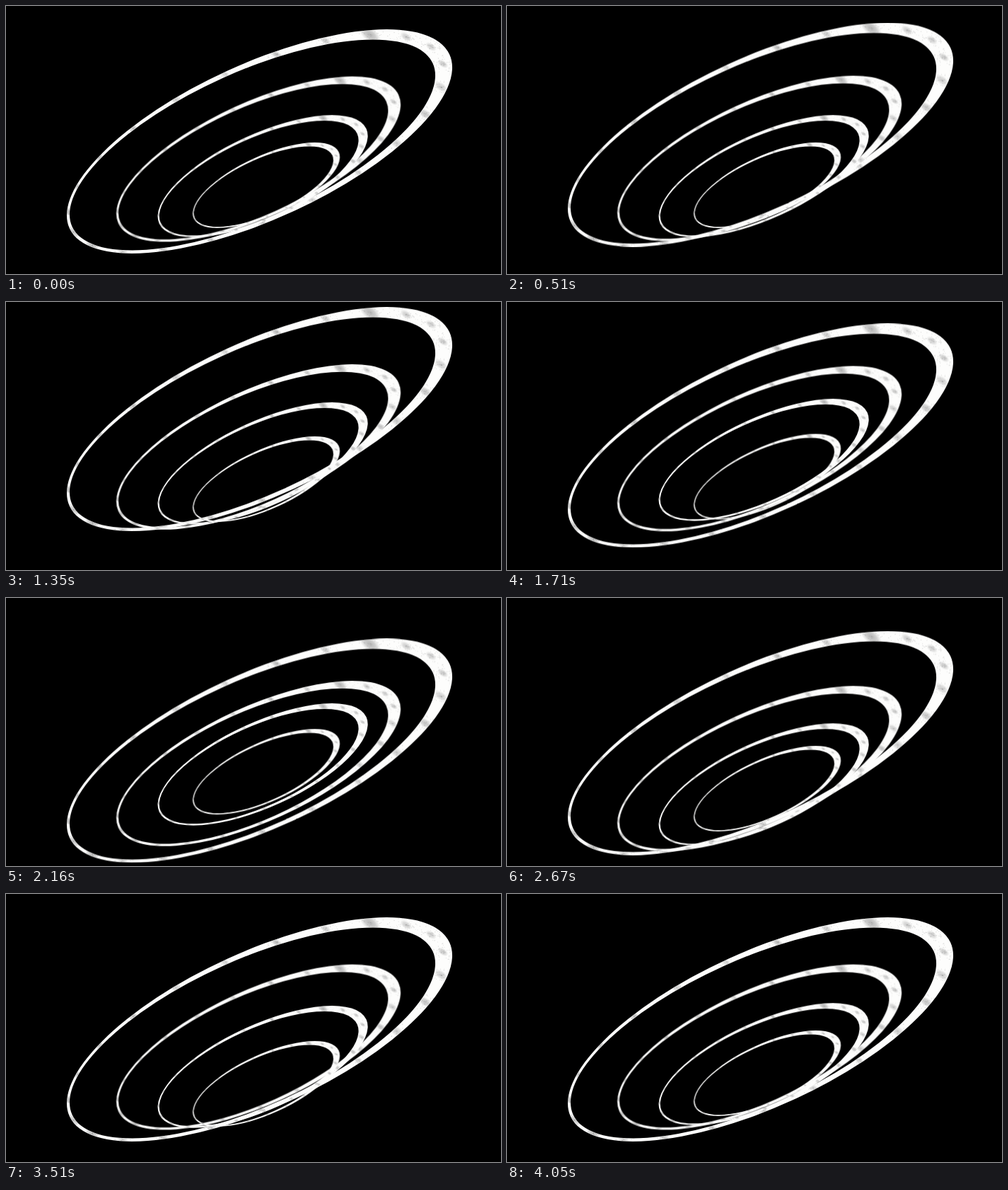
These frames come from a looping animation (700 by 379 pixels, 4.08 s). An HTML page:

```html
<!DOCTYPE html>
<html lang="en">
<head>
<meta charset="utf-8">
<title>Floating rings</title>
<style>
html, body { margin: 0; width: 100%; height: 100%; overflow: hidden; background: #000; }
svg { display: block; width: 100%; height: 100%; }

.ring {
  animation: bob 4080ms cubic-bezier(.37, 0, .63, 1) var(--delay) infinite both;
}
@keyframes bob {
  0% { transform: translateY(0); }
  31% { transform: translateY(var(--rise)); }
  53.7% { transform: translateY(var(--sink)); }
  79.2%, 100% { transform: translateY(0); }
}
</style>
</head>
<body>
<svg viewBox="0 0 700 379">
  <defs>
    <clipPath id="bandClip"><path id="band" fill-rule="evenodd" clip-rule="evenodd"/></clipPath>
    <radialGradient id="smudge">
      <stop offset="0" stop-color="#888" stop-opacity=".6"/>
      <stop offset=".5" stop-color="#888" stop-opacity=".4"/>
      <stop offset="1" stop-color="#999" stop-opacity="0"/>
    </radialGradient>
    <g id="marble">
      <use href="#band" fill="#fdfdfc"/>
      <g id="stains" clip-path="url(#bandClip)"></g>
    </g>
  </defs>
  <g id="rings"></g>
</svg>
<script>
const SVG = 'http://www.w3.org/2000/svg';
const RAD = Math.PI / 180;
const byId = id => document.getElementById(id);

function add(parent, tag, attrs) {
  const el = document.createElementNS(SVG, tag);
  for (const key in attrs) el.setAttribute(key, attrs[key]);
  parent.appendChild(el);
  return el;
}

let seed = 11;
const random = () => (seed = seed * 16807 % 2147483647) / 2147483647;

// Ellipses are tilted counterclockwise; angles run the same way.
const outer = { x: 358.5, y: 191.5, a: 295.5, b: 109.8, tilt: 24.6 };
const inner = { x: 348.5, y: 196.5, a: 279.9, b: 103.5, tilt: 24.35 };

function pointOn({ x, y, a, b, tilt }, degrees) {
  const u = a * Math.cos(degrees * RAD), v = b * Math.sin(degrees * RAD);
  const c = Math.cos(tilt * RAD), s = Math.sin(tilt * RAD);
  return [x + u * c - v * s, y - u * s - v * c];
}

function outline(e) {
  const start = pointOn(e, 180), end = pointOn(e, 0);
  // Slightly short radii are scaled up to span both ends exactly.
  const arc = `A${e.a * .999} ${e.b * .999} ${-e.tilt} 1 1 `;
  return `M${start}${arc}${end}${arc}${start}Z`;
}

// The offset inner ellipse makes the band thin on the left, thick on the right.
byId('band').setAttribute('d', outline(outer) + outline(inner));

const STAINS = 23;
let specks = '';
for (let i = 0; i < STAINS; i++) {
  const angle = 43 + i * 360 / STAINS;
  const p = pointOn(outer, angle), q = pointOn(inner, angle);
  const x = (p[0] + q[0]) / 2, y = (p[1] + q[1]) / 2;
  const size = i ? 8 + random() * 5 : 17;
  add(byId('stains'), 'ellipse', {
    rx: size, ry: size * .55, fill: 'url(#smudge)', opacity: i ? .5 + random() * .4 : 1,
    transform: `translate(${x} ${y}) rotate(35)`
  });
  for (let n = 0; n < 45; n++) {
    const turn = random() * 2 * Math.PI, reach = random() * size * 2;
    const sx = x + Math.cos(turn) * reach, sy = y + Math.sin(turn) * reach * .7;
    specks += `M${sx.toFixed(1)} ${sy.toFixed(1)}h${(.5 + random()).toFixed(1)}`;
  }
}
add(byId('stains'), 'path', { d: specks, stroke: '#777', 'stroke-opacity': .35, 'stroke-width': .8 });

const rings = [
  { x: 358.5, y: 191.5, scale: 1, rise: -27, sink: 24.5 },
  { x: 357, y: 216.5, scale: .7376, rise: -12.2, sink: 27.2 },
  { x: 363, y: 240.6, scale: .545, rise: -17.7, sink: 23.7 },
  { x: 368, y: 253.5, scale: .3816, rise: -8.2, sink: 27.2 }
];

rings.forEach(({ x, y, scale, rise, sink }, i) => {
  const ring = add(byId('rings'), 'g', {
    class: 'ring',
    style: `--delay:${i * 277}ms;--rise:${rise}px;--sink:${sink}px`
  });
  add(ring, 'use', {
    href: '#marble',
    transform: `translate(${x} ${y}) scale(${scale}) translate(${-outer.x} ${-outer.y})`
  });
});
</script>
</body>
</html>
```
